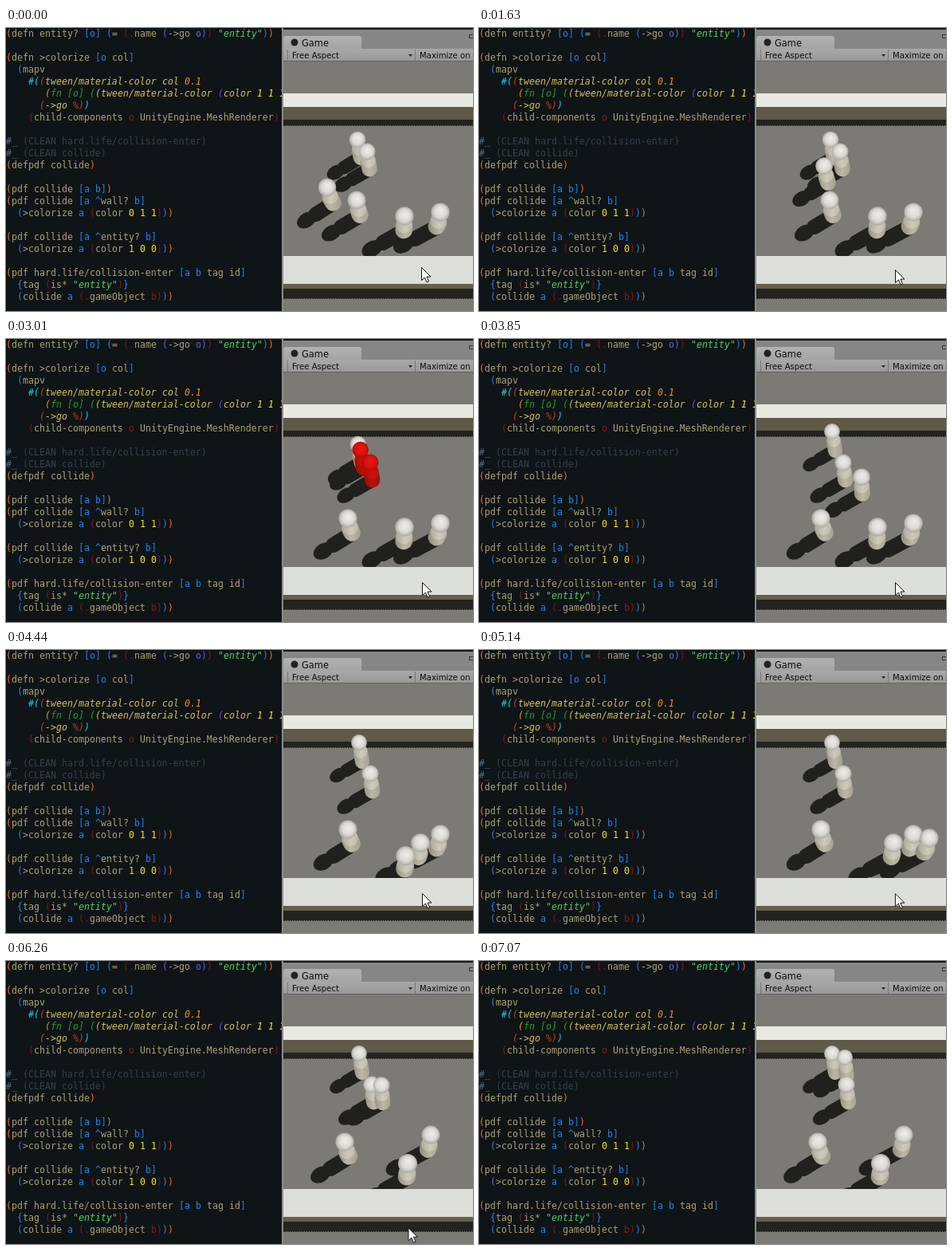
An HTML page with a canvas for the animation above (7.17 s loop, 586 by 355 pixels).

```html
<!DOCTYPE html>
<html lang="en">
<head>
<meta charset="utf-8">
<title>Collision demo</title>
<style>
html, body { margin: 0; width: 100%; height: 100%; overflow: hidden; background: #0f1417; }
canvas { display: block; }
</style>
</head>
<body>
<canvas id="stage" width="586" height="355"></canvas>
<script>
const W = 586, H = 355, LOOP = 7170, LEFT = 348;
const CELL = 7, LINE = 15;
const MONO = '11.628px "DejaVu Sans Mono", monospace';
const UI = '"DejaVu Sans", sans-serif';
const SHADE = '#20211c';
const ctx = document.getElementById('stage').getContext('2d');

const CODE = `(defn entity? [o] (= (.name (->go o)) "entity"))

(defn >colorize [o col]
  (mapv
    #((tween/material-color col 0.1
       (fn [o] ((tween/material-color (color 1 1 1) 0.1) o)))
      (->go %))
    (child-components o UnityEngine.MeshRenderer)

#_ (CLEAN hard.life/collision-enter)
#_ (CLEAN collide)
(defpdf collide)

(pdf collide [a b])
(pdf collide [a ^wall? b]
  (>colorize a (color 0 1 1)))

(pdf collide [a ^entity? b]
  (>colorize a (color 1 0 0)))

(pdf hard.life/collision-enter [a b tag id]
  {tag (is* "entity")}
  (collide a (.gameObject b)))`.split('\n');

// Bracket colours by depth, outside and inside the #( ) form
const RAINBOW = ['#f4701c', '#1e86f0', '#86191a', '#5b62e6'];
const LAMBDA = ['', '', '#18cfe6', '#c8401c', '#f0901c', '#22a022', '#d8c020', '#6a45e0'];

function wordColor(tok, inner, lambda) {
  if (tok[0] === '"') return '#4fd45f';
  if (/^\d/.test(tok)) return lambda && inner === LAMBDA[3] ? '#f0901c' : '#f6e11c';
  if (tok === 'fn') return '#22a022';
  if (/^([a-z]|[.^%])$/.test(tok)) return inner;
  return lambda ? '#d6c05a' : '#aca272';
}

function drawCode(c) {
  c.fillStyle = '#0f1417';
  c.fillRect(0, 0, LEFT, H);
  c.save();
  c.beginPath();
  c.rect(0, 0, 346, H);
  c.clip();
  let depth = 0;
  CODE.forEach((line, row) => {
    const y = 11 + row * LINE;
    const lambda = row > 3 && row < 7;
    const shades = lambda ? LAMBDA : RAINBOW;
    const shade = d => shades[Math.max(0, d) % shades.length];
    if (line[0] === '(') depth = 0;
    if (line.startsWith('#_')) {
      c.font = MONO;
      c.fillStyle = '#4b6a84';
      c.fillText('#_', 0, y);
      c.fillStyle = '#35414c';
      c.fillText(line.slice(3), 3 * CELL, y);
      return;
    }
    for (const m of line.matchAll(/"[^"]*"|[()[\]{}#^.](?![a-z]*Mesh)|[^\s()[\]{}#"^]+/g)) {
      const tok = m[0];
      if ('([{'.includes(tok)) c.fillStyle = shade(depth++);
      else if (')]}'.includes(tok)) c.fillStyle = shade(--depth);
      else if (tok === '#') c.fillStyle = LAMBDA[2];
      else c.fillStyle = wordColor(tok, shade(depth - 1), lambda);
      c.font = (lambda || tok[0] === '"' ? 'italic ' : '') + MONO;
      c.fillText(tok, m.index * CELL, y);
    }
  });
  c.restore();
}

function band(c, y, h, color) {
  c.fillStyle = color;
  c.fillRect(LEFT, y, W - LEFT, h);
}

function fade(c, y0, y1, a, b) {
  const g = c.createLinearGradient(0, y0, 0, y1);
  g.addColorStop(0, a);
  g.addColorStop(1, b);
  return g;
}

function wallShadow(c, y, h) {
  band(c, y, h, '#23241f');
  c.fillStyle = '#2d2e29';
  for (let x = LEFT; x < W; x += 3) c.fillRect(x, y + h, 2, 1);
}

function drawPanel(c) {
  band(c, 0, 27, '#868686');
  band(c, 0, 2, '#17191a');
  c.fillStyle = '#8a8a8a';
  c.fillRect(346, 0, 2, H);
  c.fillStyle = fade(c, 10, 28, '#b2b2b2', '#a2a2a2');
  c.beginPath();
  c.roundRect(LEFT, 10, 98, 20, [3, 3, 0, 0]);
  c.fill();
  band(c, 26, 16, fade(c, 26, 42, '#a8a8a8', '#989898'));
  band(c, 41, 1, '#636363');
  c.fillStyle = '#777';
  for (const x of [353, 513]) c.fillRect(x, 27, 1, 14);
  c.fillStyle = '#222';
  c.beginPath();
  c.arc(362, 18, 4.5, 0, 7);
  c.fill();
  c.beginPath();
  c.moveTo(505, 33);
  c.lineTo(510, 33);
  c.lineTo(507.5, 36);
  c.fill();
  c.strokeStyle = '#333';
  c.strokeRect(581.5, 8.5, 6, 4);
  c.fillStyle = '#0c0c0c';
  c.font = '11.4px ' + UI;
  c.fillText('Game', 371, 23);
  c.font = '10.1px ' + UI;
  c.fillText('Free Aspect', 359, 38);
  c.fillText('Maximize on Play', 519, 38);
}

function drawArena(c) {
  band(c, 42, H - 42, '#7b7a75');
  band(c, 82, 17, '#e7e9e1');
  band(c, 99, 16, '#5e5948');
  wallShadow(c, 115, 7);
  band(c, 286, 35, '#dcdeda');
  band(c, 321, 6, '#655f4b');
  wallShadow(c, 327, 12);
}

const backdrop = document.createElement('canvas');
backdrop.width = W;
backdrop.height = H;
for (const draw of [drawCode, drawArena, drawPanel]) draw(backdrop.getContext('2d'));

const ramp = (t, from, span) => Math.min(1, Math.max(0, (t - from) / span));

// Resting pawns: head position and pushes of [time, dx, dy]
const resting = [
  { at: [441, 140], pushes: [[2930, 2, -24]], hit: 3060 },
  { at: [453, 155], pushes: [[2600, 4, 0], [6150, 4, 0]], hit: 2900 },
  { at: [440, 216], pushes: [[2100, -11, 9], [5780, -4, 2]] },
  { at: [500, 236], pushes: [[4020, 20, 6], [5200, -16, 12]] },
  { at: [545, 231], pushes: [[5160, -12, -13]] }
];
const PUSH = 240;

// Turning points of the pawn that runs around
const route = [
  [1380, 403, 200], [1630, 433, 173], [2070, 461, 200], [2400, 449, 216],
  [2840, 437, 154], [3150, 451, 127], [3540, 474, 137], [3850, 480, 173],
  [4240, 488, 239], [4450, 502, 259], [4990, 575, 248], [5140, 565, 236],
  [5760, 451, 226], [6460, 479, 128], [7070, 459, 121]
];

function runner(t) {
  const hop = Math.sin(Math.PI * ramp(t, 880, 230));
  const i = Math.max(1, route.findIndex(p => p[0] > t));
  const [a, b] = t >= 7070 ? route.slice(-2) : [route[i - 1], route[i]];
  const k = ramp(t, a[0], b[0] - a[0]);
  return [a[1] + (b[1] - a[1]) * k + 8 * hop, a[2] + (b[2] - a[2]) * k - 10 * hop];
}

function pushed({ at, pushes }, t) {
  return pushes.reduce(([x, y], [start, dx, dy]) => {
    const k = ramp(t, start, PUSH);
    return [x + dx * k, y + dy * k];
  }, at);
}

// Quick tween to red and back
const redness = (hit, t) => hit ? ramp(t, hit, 100) - ramp(t, hit + 160, 100) : 0;

// Perspective: pawns lean away from the middle of the view
function shape([x, y], red) {
  return { x, y, red, r: 9.6 + (y - 116) * .015,
    bx: x + (490 - x) * .085, by: y + 33 - (y - 116) * .04 };
}

function drawShadow({ x, y, r, bx, by }) {
  const tx = x - 21 - (x - 403) * .13 - (y - 120) * .06, ty = y + 41;
  const sx = bx - 1, sy = by - 9;
  ctx.strokeStyle = ctx.fillStyle = SHADE;
  ctx.lineCap = 'round';
  ctx.lineWidth = r * 1.7;
  ctx.beginPath();
  ctx.moveTo(sx, sy);
  ctx.lineTo(sx + (tx - sx) * .65, sy + (ty - sy) * .65);
  ctx.stroke();
  ctx.beginPath();
  ctx.ellipse(tx, ty, r * 1.2, r * .85, Math.atan2(ty - sy, tx - sx), 0, 7);
  ctx.fill();
}

// A warm or neutral grey mixed with red
function tone(level, warmth, red) {
  const base = [level, level - warmth / 4, level - warmth];
  const hot = [level, level * .08, level * .06];
  return `rgb(${base.map((v, i) => Math.round(v + (hot[i] - v) * red))})`;
}

function sideLight(x, r, light, dark, warmth, red) {
  const g = ctx.createLinearGradient(x - r, 0, x + r, 0);
  g.addColorStop(0, tone(dark, warmth, red));
  g.addColorStop(.55, tone(light, warmth, red));
  g.addColorStop(1, tone((light + dark) / 2, warmth, red));
  return g;
}

function drawPawn({ x, y, r, bx, by, red }) {
  const mx = (x + bx) / 2;
  ctx.lineCap = 'round';
  ctx.lineWidth = r * 1.9;
  ctx.strokeStyle = sideLight(mx, r, 188, 150, 22, red);
  ctx.beginPath();
  ctx.moveTo(mx, y + 13);
  ctx.lineTo(bx, by - r * .95);
  ctx.stroke();
  ctx.fillStyle = sideLight(mx, r, 206, 170, 18, red);
  ctx.beginPath();
  ctx.ellipse(mx, y + 11, r * .9, r * .9, 0, 0, 7);
  ctx.fill();
  const g = ctx.createRadialGradient(x + 1, y - 2, 1, x, y, r + .6);
  g.addColorStop(0, tone(236, 4, red));
  g.addColorStop(.6, tone(218, 6, red));
  g.addColorStop(1, tone(168, 10, red));
  ctx.fillStyle = g;
  ctx.beginPath();
  ctx.arc(x, y, r + .3, 0, 7);
  ctx.fill();
}

const arrow = new Path2D('M0 0V16L4 12.5 6.5 18.5 9 17.5 6.5 11.5H11.5Z');

function drawPointer(t) {
  const leave = ramp(t, 5850, 770);
  const x = 521 + ramp(t, 490, 240) - ramp(t, 5100, 400) - 31 * leave;
  const y = 300 + 3 * ramp(t, 490, 240) + 2 * ramp(t, 2120, 280) + 2 * ramp(t, 5100, 400) + 51 * leave;
  ctx.save();
  ctx.translate(x + .5, y + .5);
  ctx.fillStyle = '#fff';
  ctx.fill(arrow);
  ctx.strokeStyle = '#111';
  ctx.lineWidth = 1;
  ctx.stroke(arrow);
  ctx.restore();
}

function clipTo(y0, y1, draw) {
  ctx.save();
  ctx.beginPath();
  ctx.rect(LEFT, y0, W - LEFT, y1 - y0);
  ctx.clip();
  draw();
  ctx.restore();
}

function render(t) {
  ctx.drawImage(backdrop, 0, 0);
  const pawns = resting.map(p => shape(pushed(p, t), redness(p.hit, t)));
  pawns.push(shape(runner(t), redness(2900, t)));
  pawns.sort((a, b) => a.y - b.y);
  clipTo(122, 286, () => pawns.forEach(drawShadow));
  clipTo(42, 286, () => pawns.forEach(drawPawn));
  drawPointer(t);
}

const start = performance.now();
function tick() {
  render((performance.now() - start) % LOOP);
  requestAnimationFrame(tick);
}
tick();
</script>
</body>
</html>
```
